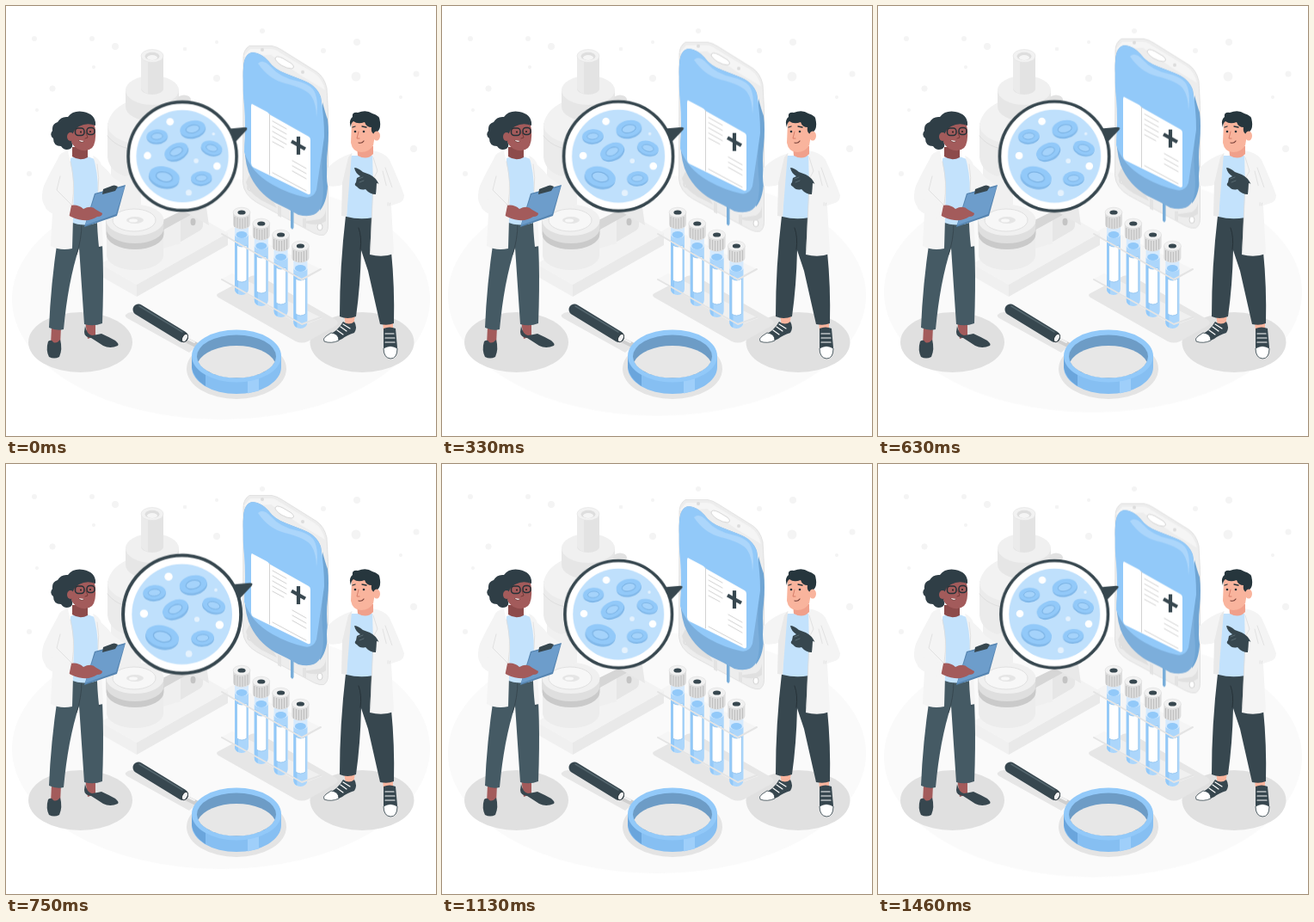
These frames come from a looping animation (500x500 px, 1.5 s). An HTML page:

```html
<!DOCTYPE html>
<html lang="en">
<head>
<meta charset="utf-8">
<title>Blood laboratory</title>
<style>
html, body { margin: 0; width: 100%; height: 100%; overflow: hidden; background: #fff; }
svg { display: block; width: 100vw; height: 100vh; }
.float { animation: float 1.5s linear infinite; }
.beat { transform-origin: 211px 174.5px; animation: beat 1.5s linear infinite; }
@keyframes float { 50% { transform: translateY(-10px); } }
@keyframes beat {
  0%, 25%, 40%, 60%, 100% { transform: scale(1); }
  10% { transform: scale(1.1); }
  50% { transform: scale(1.1); animation-timing-function: ease; }
}
.line { fill: none; stroke-linecap: round; stroke-linejoin: round; }
.dark { fill: #37474f; }
.blue { fill: #92c9f9; }
.pale { fill: #c3e2fc; }
.coat { fill: #f4f4f4; }
.brown { fill: #a35b5b; }
.peach { fill: #f9b49d; }
.fold { stroke: #dcdcdc; stroke-width: .8; }
</style>
</head>
<body>
<svg viewBox="0 0 500 500">
  <defs>
    <g id="cell">
      <ellipse cy="1.5" rx="12" ry="8" fill="#82b9ea"/>
      <ellipse rx="12" ry="7.6" class="blue"/>
      <ellipse cy=".3" rx="6.5" ry="3.7" fill="#a5d3fb" stroke="#7cb3e4" stroke-width=".8"/>
    </g>
    <g id="tube">
      <path d="M266 254V329a8 7 0 0 0 16 0V254Z" fill="#d6eafd"/>
      <path d="M266 266a8 4 0 0 0 16 0V329a8 7 0 0 1-16 0Z" fill="#acd6fb"/>
      <ellipse cx="274" cy="266" rx="6.5" ry="4" class="blue"/>
      <path d="M266 272v57a8 7 0 0 0 4 6v-61Z" class="blue"/>
      <path d="M268.500 278q5.500 4 11.500 0v41q-6 4-11.500 0Z" fill="#fff" stroke="#8fc2ee" stroke-width=".8"/>
      <path d="M264 240v14a10 5.500 0 0 0 20 0v-14Z" fill="#dedede"/>
      <path d="M266 245v12M269 246v12M272 247v12M275 247v12M278 246v12M281 245v12" stroke="#b4b4b4" stroke-width=".8"/>
      <ellipse cx="274" cy="240" rx="10" ry="5.800" fill="#f1f1f1" stroke="#d7d7d7" stroke-width=".5"/>
      <ellipse cx="274" cy="240" rx="4.600" ry="2.600" class="dark"/>
    </g>
  </defs>

  <ellipse class="float" cx="250" cy="341" rx="243" ry="140" fill="#fafafa"/>
  <g id="dots" fill="#f4f4f4"></g>

  <g id="shadows" fill="#e0e0e0">
    <ellipse cx="86.500" cy="391" rx="60.500" ry="35"/>
    <ellipse cx="414" cy="391" rx="60.500" ry="35"/>
    <ellipse cx="268" cy="422" rx="58" ry="35" fill="#e4e4e4"/>
    <path d="M139 359q5-5 12-2l70 39-8 7-72-40q-3-2-2-4Z" fill="#e6e6e6"/>
    <path d="M247 334l38-20q6-2 12 1l87 50q4 4-1 7l-32 18q-7 3-14 0l-90-51q-4-3 0-5Z" fill="#e6e6e6"/>
  </g>

  <g id="microscope">
    <path d="M110 300l42 24 106-60-44-25Z" fill="#f3f3f3"/>
    <path d="M110 300v14l42 24v-14Z" fill="#f0f0f0"/>
    <path d="M152 324l106-60v14l-106 60Z" fill="#e9e9e9"/>
    <path d="M117 262v28a33 17 0 0 0 66 0v-28Z" fill="#ececec"/>
    <path d="M183 256l46-25v24q0 4-5 7l-24 14-17 5Z" fill="#e6e6e6"/>
    <path d="M183 256l20-11v31l-20 6Z" fill="#efefef"/>
    <path d="M180 250l49-24v9l-49 27Z" fill="#d6d6d6"/>
    <ellipse cx="217.500" cy="251" rx="3" ry="4.200" fill="#c4c4c4"/>
    <path d="M116.500 249v16a33.500 18 0 0 0 67 0v-16Z" fill="#cacaca"/>
    <path d="M116.500 249v9a33.500 18 0 0 0 67 0v-9Z" fill="#dfdfdf"/>
    <ellipse cx="150" cy="249" rx="33.500" ry="18" fill="#f0f0f0"/>
    <ellipse cx="149" cy="249" rx="25" ry="13" fill="#f7f7f7" stroke="#e1e1e1"/>
    <ellipse cx="150" cy="249" rx="10" ry="4" fill="#e5e5e5"/>
    <ellipse cx="148" cy="249.500" rx="5" ry="2" fill="#f8f8f8"/>
    <path d="M122 180h35v51q-17 9-35 0Z" fill="#f0f0f0"/>
    <path d="M185 105q28 4 33 24l18 126-42-24-20-80Z" fill="#e9e9e9"/>
    <path d="M118 136v39q1 16 20 23l50-12v-50Z" fill="#ebebeb"/>
    <path d="M118 138q3-17 22-26l55 12-9 30q-35 13-58-1-10-7-10-15Z" fill="#f2f2f2"/>
    <path d="M118 151q13 18 48 17" class="line" stroke="#dedede"/>
    <path d="M139 97v20a31 17 0 0 0 62 0v-20Z" fill="#e6e6e6"/>
    <ellipse cx="170" cy="98" rx="31" ry="17" fill="#f0f0f0"/>
    <path d="M157 58v38a13 7 0 0 0 26 0v-38Z" fill="#e3e3e3"/>
    <path d="M157 58v38q3 5 8 6v-40Z" fill="#ebebeb"/>
    <ellipse cx="170" cy="58" rx="13" ry="7.500" fill="#f2f2f2" stroke="#e2e2e2" stroke-width=".6"/>
    <ellipse cx="170" cy="58.500" rx="8.500" ry="4.700" fill="#dedede"/>
    <ellipse cx="170" cy="60" rx="6" ry="3" fill="#f5f5f5"/>
    <ellipse cx="207" cy="109" rx="8" ry="5.500" fill="#e2e2e2"/>
  </g>

  <g id="bag" class="float">
    <path d="M276 60q0-9 7-13.500h26q6 1 12 5l40 25q9 6 12 19l1.500 28v132q0 8-5 11-4 1-11-2l-67-36q-15-9-16-23Z" fill="#ededed" stroke="#dcdcdc" stroke-width=".8"/>
    <path d="M276 59l8-9h24q5 0 10 4l40 24q10 6 13 20l-28-17-35-24Z" fill="#f5f5f5"/>
    <path d="M313 61q1-4 9 0l10 6q5 5 0 6-5 0-12-4-7-5-7-8Z" fill="#fff" stroke="#d6d6d6"/>
    <circle cx="298" cy="51" r="2" fill="#dcdcdc"/><circle cx="345" cy="77" r="2" fill="#dcdcdc"/>
    <ellipse cx="284" cy="211" rx="3" ry="4" fill="#fff" stroke="#d4d4d4"/>
    <ellipse cx="365" cy="257" rx="3" ry="4" fill="#fff" stroke="#d4d4d4"/>
    <path d="M279 205q3 12 18 21l18 9-10-18-22-20ZM345 251l20-3q6-3 7-11v13q-10 8-27 1Z" fill="#e0e0e0"/>
    <path d="M316 232v12l4 2v-12ZM345 247v10l4 2v-12Z" fill="#e3e3e3"/>
    <path d="M331 237h3.500v21l-1.500 2-2-2Z" fill="#78add9"/>
    <path d="M368 112q3 12 6 20 2 15 0 35-2 17 0 34 1 25-9 37Z" fill="#6fa5d4"/>
    <path d="M276 72q1-17 11-18 10 1 18 10 7 10 21 15l18 7q17 6 22 20 4 24 4 46-4 24-2 48 3 27-4 38-7 9-24 5-14-8-27-14-22-13-31-36-6-18-4-40 2-31-1-58-2-13-1-23Z" fill="#7caedb"/>
    <path d="M276 72q1-17 11-18 10 1 18 10 7 10 21 15l18 7q17 6 22 20 4 24 4 46-5 35-9 62-4 11-15 8-18-4-36-14-25-14-33-38 2-31 0-54-2-15-1-44Z" class="blue"/>
    <path d="M293 67q12 18 31 23 25 6 31 15 6 9 6 25 3-24-4-33-6-7-20-10-18-4-29-16-9-10-15-4Z" fill="#acd6fb"/>
    <path d="M286 114l17 9q2 1 3 3l46 26q2 1 2 4v61q0 3-3 2l-63-31q-3-2-3-5v-66q0-3 1-3Z" fill="#fff"/>
    <g class="line" stroke="#d2d2d2" stroke-width="1">
      <path d="M306.500 126v70"/>
      <path d="M310 134l16 9M310 140l16 9M310 146l16 9M310 152l16 9M310 158l13 7M333 180l16 9M333 186l16 9M333 192l16 9M310 194l39 21"/>
    </g>
    <path d="M340 152v21M332 157.500l16 9" class="line" stroke="#37474f" stroke-width="4.200" style="stroke-linecap:butt"/>
  </g>

  <g id="bubble" class="beat">
    <path d="M256 143.500l21-2q4 0 2 3l-13 14Z" class="dark"/>
    <circle cx="205.200" cy="174.700" r="62.300" fill="#fff" stroke="#37474f" stroke-width="3.600"/>
    <circle cx="205.200" cy="174.700" r="53" fill="#bfe0fc"/>
    <g id="cells"></g>
    <g fill="#fff">
      <circle cx="191" cy="135" r="4.300"/><circle cx="165" cy="174" r="4.300"/><circle cx="245" cy="186" r="4.300"/>
      <g opacity=".6"><circle cx="212.500" cy="216.500" r="3.500"/><circle cx="221" cy="180" r="2.800"/><circle cx="241" cy="149" r="1.700"/></g>
    </g>
  </g>

  <g id="rack">
    <path d="M250 318l13-7 105 52-24 9Z" fill="#f4f4f4" opacity=".7"/>
    <path d="M250 265l14-8 102 49-22 13Z" fill="#f3f3f3" opacity=".7"/>
    <g id="tubes"></g>
    <g class="line" stroke="#e4e4e4" stroke-width="2"><path d="M251 265l93 53 22-12M251 318l93 52 22-8"/></g>
  </g>

  <g id="magnifier">
    <path d="M205 386l16 8" class="line" stroke="#cfcfcf" stroke-width="6"/>
    <path d="M205 384l14 7" class="line" stroke="#f1f1f1" stroke-width="2"/>
    <path d="M154 353l51.500 31.500" class="line" stroke="#37474f" stroke-width="13"/>
    <path d="M155 349l50 30" class="line" stroke="#53656d" stroke-width="1.500"/>
    <ellipse cx="208" cy="386" rx="3" ry="5" transform="rotate(28 208 386)" fill="#f2f2f2" stroke="#263238"/>
    <path d="M216 406v14a52 31 0 0 0 104 0v-14Z" fill="#86bff2"/>
    <path d="M216 406v14q2 13 16 22v-15Z" fill="#6aa5dc"/>
    <path d="M281 436v14.500l13-3v-14.500Z" fill="#9fcffa"/>
    <ellipse cx="268" cy="407" rx="52" ry="30.500" class="blue"/>
    <ellipse cx="268" cy="407.500" rx="46" ry="25" fill="#6d9cc6"/>
    <path d="M223.500 413.700A46 25 0 0 1 312.500 413.700 46 25 0 0 1 223.500 413.700Z" fill="#e7e7e7"/>
  </g>

  <g id="woman">
    <path d="M53 373h11l-1 21H52ZM92 366h12v18l-9 3Z" class="brown"/>
    <path d="M49 390q4-3 6 1 4 2 8-3 3 11-1 20-6 3-12 0-4-8-1-18ZM92 372q2 10 8 11 7-1 11-2 9 4 16 8 5 4 3 6-9 4-17 0-6-4-14-9-8-1-8-7Z" class="dark"/>
    <path d="M78 240h31q6 50 3 129-10 4-21 1-3-44-6-89-13 40-18 95-8 2-17-2 2-50 10-103Z" fill="#455a64"/>
    <path d="M88 252q0 20-6 37M106 255q4 11 3 27" class="line" stroke="#37474f"/>
    <path d="M110 184q8 6 14 15l13 9-9 18q-17-8-21-20Z" class="coat"/>
    <path d="M75 177q16-6 31 3l5 28-2 43q-18 7-34 0Z" class="pale"/>
    <path d="M101 174q11 4 12 22l-3 30 3 53-5 1q-4-38-1-63 0-25-6-43Z" class="coat"/>
    <path d="M72 169q-9 0-12 9-9 16-16 31-5 16 2 25l8 6-2 39q11 6 25 3l2-70q-2-24-7-43Z" class="coat"/>
    <path d="M63 198l-4 16 17 17M75 181q6 23 2 50M54 238l17 6M106 184q3 15 1 31" class="line fold"/>
    <path d="M103 218l36-10-10 36-38 13Z" fill="#5685b1"/>
    <path d="M104 219l34-9-10 32-36 13Z" fill="#6d9dcb"/>
    <path d="M113 213q5-2 8-3 5-3 9 0l-3 5-15 4Z" class="dark"/>
    <path d="M74 232q10-2 16 4 9-5 15 1l7 4q0 4-6 4-7 5-17 4-9-1-17-6Z" class="brown"/>
    <path d="M49 224l27 8-3 15q-20-3-27-12Z" class="coat"/>
    <path d="M77 164v11q9 6 18 1v-12Z" fill="#8d4b4b"/>
    <path d="M78 132q13-8 24 1l2 11q1 16-4 21-7 6-17 1-11-7-9-22Z" class="brown"/>
    <path d="M104 139q1-13-14-16-12-2-18 6-8-1-12 6-7 2-6 10-4 5 1 9 0 9 9 9 4 6 11 3 4-3 1-8l1-8q3-8 8-10 9-5 19-1Z" fill="#2f3e46"/>
    <ellipse cx="75" cy="152" rx="4" ry="5" class="brown"/>
    <rect x="80.500" y="142" width="10.500" height="8.500" rx="3.500" fill="none" stroke="#263238" stroke-width="1.500"/>
    <rect x="94" y="141.500" width="9" height="8" rx="3.500" fill="none" stroke="#263238" stroke-width="1.500"/>
    <circle cx="87" cy="146.500" r="1" fill="#222"/><circle cx="98" cy="146" r="1" fill="#222"/>
    <path d="M93 147l2 6-3 1" class="line" stroke="#743c39" stroke-width="1"/>
    <path d="M84 156q4 4 7 1" fill="#fff" stroke="#6b3533" stroke-width=".8"/>
  </g>

  <g id="man">
    <path d="M393 358h13l-2 15h-9ZM438 366h12v12h-11Z" class="peach"/>
    <path d="M392 367q7 5 13 0 4 7 0 13-9 3-14 7-9 5-19 3-3-4 2-7 12-5 18-16ZM439 375q7-3 14 0l2 22q1 12-8 13-8-1-8-11Z" class="dark"/>
    <path d="M378 380q9 1 9 9-9 4-17 1-2-3 2-6ZM439 398q8-5 16 0 0 12-8 12-8-1-8-12Z" fill="#fff" stroke="#37474f" stroke-width=".8"/>
    <path d="M385 377l7 5M389 373l7 5M392 370l8 5M441 381h10M441 386h11M441 391h11" class="line" stroke="#fff" stroke-width="1.200"/>
    <path d="M395 244h30l23 42q4 40 3 83-7 3-16 1l-14-62-8-24q-1 42-6 77-10 4-19 0 0-58 7-117Z" class="dark"/>
    <path d="M410 258q4 11 2 25" class="line" stroke="#263238"/>
    <path d="M399 174h28v72q-16 3-31-1Z" class="pale"/>
    <path d="M403 171q-17 5-29 17-2 10 0 21 10 2 20-2l3-21Z" class="coat"/>
    <path d="M402 171l-6 74-6-1 1-38 7-30Z" fill="#e9e9e9"/>
    <path d="M426 168q16 3 20 11 11 24 17 41 0 7-6 9l-9 3 3 56q-13 5-28 1l4-75Z" class="coat"/>
    <path d="M441 188l9 26-4 18M427 176l5 16-5 9-3 81M438 192l7 28-1 12" class="line fold"/>
    <path d="M405 188q4 0 10 5l8 3q7 3 11 12l-4 11q-7 0-12-6-6 2-10-3-4-2-1-5l1-5 4-2q-6-4-7-10Z" class="dark"/>
    <path d="M431 206l22 6 5 16q-15 4-28-7Z" class="coat"/>
    <path d="M410 201l5-2M411 205l5-2" class="line" stroke="#596b73"/>
    <path d="M408 163h19v9q-7 8-18 2Z" fill="#f0a08b"/>
    <path d="M402 135q12-8 26 0 2 14-1 27-5 8-14 8-10 0-12-11Z" class="peach"/>
    <path d="M401 141q-3-8 2-12-1-6 6-5 10-4 17 1 9 2 9 10 1 9-4 12l-3 2q-4-2-3-8-6 0-8-6-8 3-13-1-3 2-3 7Z" fill="#26363d"/>
    <ellipse cx="431" cy="151" rx="4" ry="5.500" class="peach"/>
    <circle cx="406" cy="146" r="1.300" fill="#263238"/><circle cx="416" cy="146" r="1.300" fill="#263238"/>
    <path d="M403 141l3-1M414 140l5 1" class="line" stroke="#263238" stroke-width="1.300"/>
    <path d="M410 146l-2 8h3" class="line" stroke="#d67d69" stroke-width="1"/>
    <path d="M410 159q4 1 6-2" class="line" stroke="#743e37" stroke-width="1.200"/>
  </g>
</svg>
<script>
const $ = id => document.getElementById(id);
const fill = (id, list, make) => { $(id).innerHTML = list.map(make).join(''); };

// x, y, radius
fill('dots', [
  [33, 38, 3], [100, 38, 3], [127, 47, 4], [102, 71, 2], [54, 96, 3.5], [36, 121, 2],
  [27, 195, 3], [208, 50, 2.3], [245, 42, 2], [298, 29, 3], [245, 84, 4], [369, 52, 3],
  [408, 42, 4], [407, 82, 5.5], [477, 79, 3.5], [459, 106, 2], [474, 166, 4]
], ([x, y, r]) => `<circle cx="${x}" cy="${y}" r="${r}"/>`);

// x, y, scale, tilt
fill('cells', [
  [176, 151.5, 1, -5], [217, 143, 1.22, -12], [198, 169, 1.18, -25],
  [239, 165, 1.02, 16], [184.5, 198, 1.48, 14], [227, 199.5, 1, -4]
], ([x, y, s, a]) => `<use href="#cell" transform="translate(${x} ${y}) rotate(${a}) scale(${s})"/>`);

fill('tubes', [0, 1, 2, 3], i => `<use href="#tube" x="${i * 22.8}" y="${i * 13}"/>`);
</script>
</body>
</html>
```
